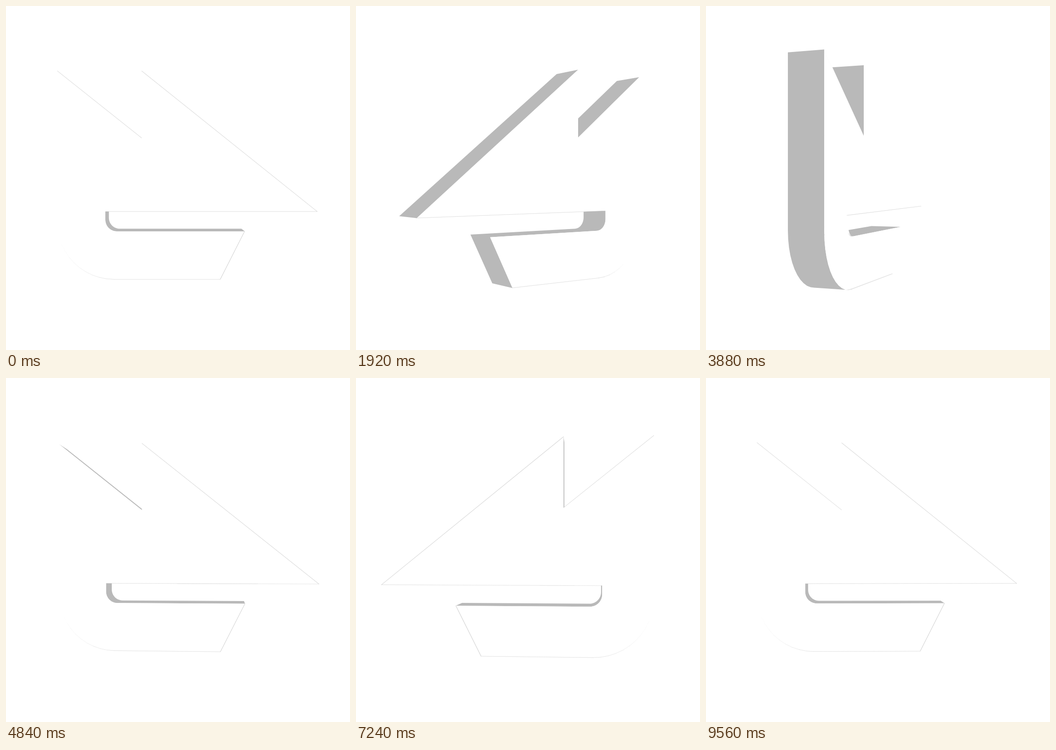
These frames come from a looping animation (748x748 px, 9.6 s). An HTML page with a canvas:

```html
<!DOCTYPE html>
<html lang="en">
<head>
<meta charset="utf-8">
<title>Turning solid</title>
<style>
  html, body { margin: 0; width: 100%; height: 100%; overflow: hidden; background: #fff; }
  canvas { display: block; width: 748px; height: 748px; }
</style>
</head>
<body>
<canvas id="stage" width="748" height="748"></canvas>
<script>
const ctx = document.getElementById('stage').getContext('2d');
const SIZE = 748, MID = SIZE / 2;
const LOOP = 9600, STEP = 40, TURN = 0.0525; // radians per step
const CAMERA = 1464, DEPTH = 75, RIM = 3;
const WHITE = '#fff', GREY = '#b9b9b9';

// Quarter arc as short chords, angles in quarter turns
function arc(cx, cy, r, from, to) {
  const n = 12;
  return Array.from({ length: n + 1 }, (_, i) => {
    const a = (from + (to - from) * i / n) * Math.PI / 2;
    return [cx + r * Math.cos(a), cy + r * Math.sin(a)];
  });
}

// Outline, relative to the turning axis
const outline = [
  [-262.5, -233], [-79, -87], [-79, -233], [303, 73], [-158, 73],
  ...arc(-133, 91, 25, 2, 1),
  [145, 116], [92, 220.5],
  ...arc(-139.5, 97.5, 123, 1, 2)
];

// Each wall: its two ends, sideways part of its normal, distance from the axis
const walls = outline.map((a, i) => {
  const b = outline[(i + 1) % outline.length];
  const dx = b[0] - a[0], dy = b[1] - a[1], len = Math.hypot(dx, dy);
  return { a, b, nx: dy / len, dist: (a[0] * dy - a[1] * dx) / len };
});

function project([x, y], z, sin, cos) {
  const scale = CAMERA / (CAMERA - x * sin - z * cos);
  return [MID + (x * cos - z * sin) * scale, MID + y * scale];
}

function addPolygon(points) {
  points.forEach((p, i) => i ? ctx.lineTo(...p) : ctx.moveTo(...p));
  ctx.closePath();
}

function draw(angle) {
  const sin = Math.sin(angle), cos = Math.cos(angle);
  const at = (p, z) => project(p, z, sin, cos);
  const addWall = ({ a, b }, z0, z1) =>
    addPolygon([at(a, z0), at(b, z0), at(b, z1), at(a, z1)]);
  const away = w => w.dist / CAMERA - w.nx * sin; // below 0 faces the viewer

  ctx.fillStyle = WHITE;
  ctx.fillRect(0, 0, SIZE, SIZE);

  ctx.fillStyle = ctx.strokeStyle = GREY;
  ctx.beginPath();
  for (const w of walls) if (away(w) < 0) addWall(w, 0, -DEPTH);
  ctx.fill();

  const front = cos > 0;
  if (!front && CAMERA * cos > -DEPTH) return;
  const z = front ? 0 : -DEPTH;
  ctx.fillStyle = WHITE;
  ctx.beginPath();
  addPolygon(outline.map(p => at(p, z)));
  ctx.fill();

  // Fine rim where walls seen at a low angle show through the face
  ctx.fillStyle = GREY;
  ctx.lineWidth = 0.4;
  for (const w of walls) {
    const tilt = away(w);
    if (tilt < 0 || tilt > 0.6) continue;
    ctx.globalAlpha = (1 + w.nx) / 2 * (1 - tilt / 0.6);
    ctx.beginPath();
    addWall(w, z, front ? z - RIM : z + RIM);
    ctx.fill();
    ctx.stroke();
  }
  ctx.globalAlpha = 1;
}

const start = performance.now();
function tick() {
  const time = (performance.now() - start) % LOOP;
  draw(Math.floor(time / STEP) * TURN);
  requestAnimationFrame(tick);
}
tick();
</script>
</body>
</html>
```
